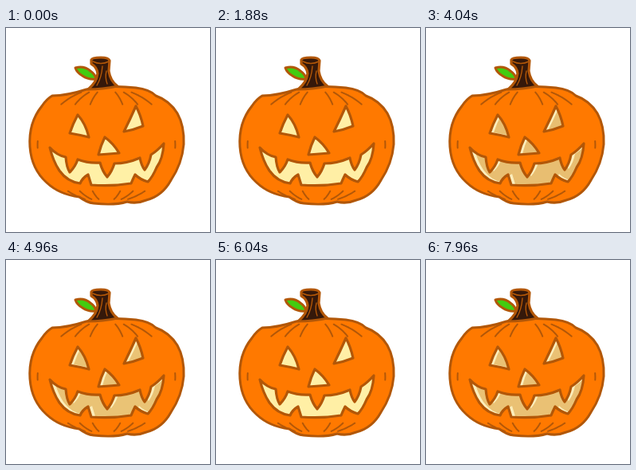
Write an HTML page with a canvas that moves like this. It is 256x256 px and loops after 8000 ms.

```html
<!DOCTYPE html>
<html lang="en">
<head>
<meta charset="utf-8">
<title>Flickering pumpkin</title>
<style>
html, body { margin: 0; width: 100%; height: 100%; overflow: hidden; background: #fff; }
canvas { display: block; width: 100vw; height: 100vh; object-fit: contain; }
</style>
</head>
<body>
<canvas id="stage" width="256" height="256"></canvas>
<script>
const ctx = document.getElementById('stage').getContext('2d');
const LOOP = 8000, STEP = 40;
const LINE = '#b25708', ORANGE = '#ff7900';

// The candle swings between bright (even entries) and dim (odd entries)
const TURNS = [0, 540, 1440, 1620, 1900, 2140, 2400, 2700, 2980, 3320, 3740,
  4060, 4640, 5040, 5560, 5820, 6060, 6420, 6860, 7320, 7760, LOOP];

function levelAt(t) {
  const i = TURNS.findIndex(turn => turn > t) - 1;
  const u = (t - TURNS[i]) / (TURNS[i + 1] - TURNS[i]);
  const swing = (1 - Math.cos(Math.PI * u)) / 2;
  return i % 2 ? swing : 1 - swing;
}

function mix(a, b, u) {
  return `rgb(${a.map((v, i) => Math.round(v + (b[i] - v) * u)).join()})`;
}

const body = new Path2D(`M58 85Q76 85 101 77Q130 71 163 75Q180 77 188 85
  Q205 91 215 107Q224 123 223 146Q221 170 207 191Q196 211 176 216
  Q164 221 152 218Q136 223 110 220Q101 219 92 212Q67 209 51 194
  Q32 177 30 149Q28 119 45 98Q51 89 58 85Z`);

// Creases run along the meridians of a flattened sphere
function creases() {
  const path = new Path2D();
  const arc = (width, from, to) => {
    for (const side of [-1, 1]) {
      const at = a => [126 + side * 96 * width * Math.sin(a), 147 - 72 * Math.cos(a)];
      path.moveTo(...at(from));
      for (let k = 1; k <= 6; k++) path.lineTo(...at(from + (to - from) * k / 6));
    }
  };
  for (const width of [0.3, 0.58, 0.84]) {
    arc(width, 0.4, 0.78);
    arc(width, 2.5, 2.8);
  }
  arc(0.9, 1.5, 1.62);
  return path;
}
const ribs = creases();

const stem = new Path2D(`M107 40Q108 37 119 37Q129 37 130 41L129 54
  Q131 67 140 73Q121 77 103 77Q114 68 115 57Q114 49 107 45Z`);
const bark = new Path2D('M109 42Q119 47 129 42M121 48Q120 62 114 72M126 54Q124 62 127 70');
const leaf = new Path2D('M87 50Q98 47 106 54Q112 58 113 64Q103 65 96 60Q89 56 87 50Z');

const face = new Path2D(`M90 109Q84 120 80 132Q92 134 104 137Q100 120 90 109Z
  M163 98Q156 114 148 130Q160 128 172 123Q169 109 163 98Z
  M124 137Q119 147 116 159Q130 158 142 157Q135 145 124 137Z
  M55 150Q64 160 75 162Q76 175 80 181Q87 174 90 165Q103 170 118 169
  Q121 180 127 187Q133 180 136 170Q152 170 168 163Q170 173 174 178
  Q180 170 182 159Q190 154 198 145Q197 164 189 175Q184 187 178 193
  Q168 190 162 184Q159 190 157 195Q132 199 107 197L103 184
  Q96 188 93 195Q77 193 67 179Q59 167 55 150Z`);

function outline(path, width) {
  ctx.lineWidth = width;
  ctx.strokeStyle = LINE;
  ctx.stroke(path);
}

function shape(path, fill, width) {
  ctx.fillStyle = fill;
  ctx.fill(path);
  outline(path, width);
}

function draw(level) {
  ctx.fillStyle = '#fff';
  ctx.fillRect(0, 0, 256, 256);
  ctx.lineCap = ctx.lineJoin = 'round';

  shape(body, ORANGE, 3);
  outline(ribs, 2);
  shape(stem, '#35180a', 3.2);
  outline(bark, 1.4);
  shape(leaf, '#43cc10', 3);

  // The carved rim stays pale while the hollow behind it dims
  ctx.save();
  ctx.clip(face);
  ctx.fillStyle = mix([252, 238, 188], [255, 240, 170], level);
  ctx.fill(face);
  ctx.translate(5, -1);
  ctx.fillStyle = mix([232, 190, 112], [255, 240, 166], level);
  ctx.fill(face);
  ctx.restore();
  outline(face, 3.2);
}

function frame(now) {
  draw(levelAt(Math.floor(now % LOOP / STEP) * STEP));
  requestAnimationFrame(frame);
}
frame(0);
</script>
</body>
</html>
```
